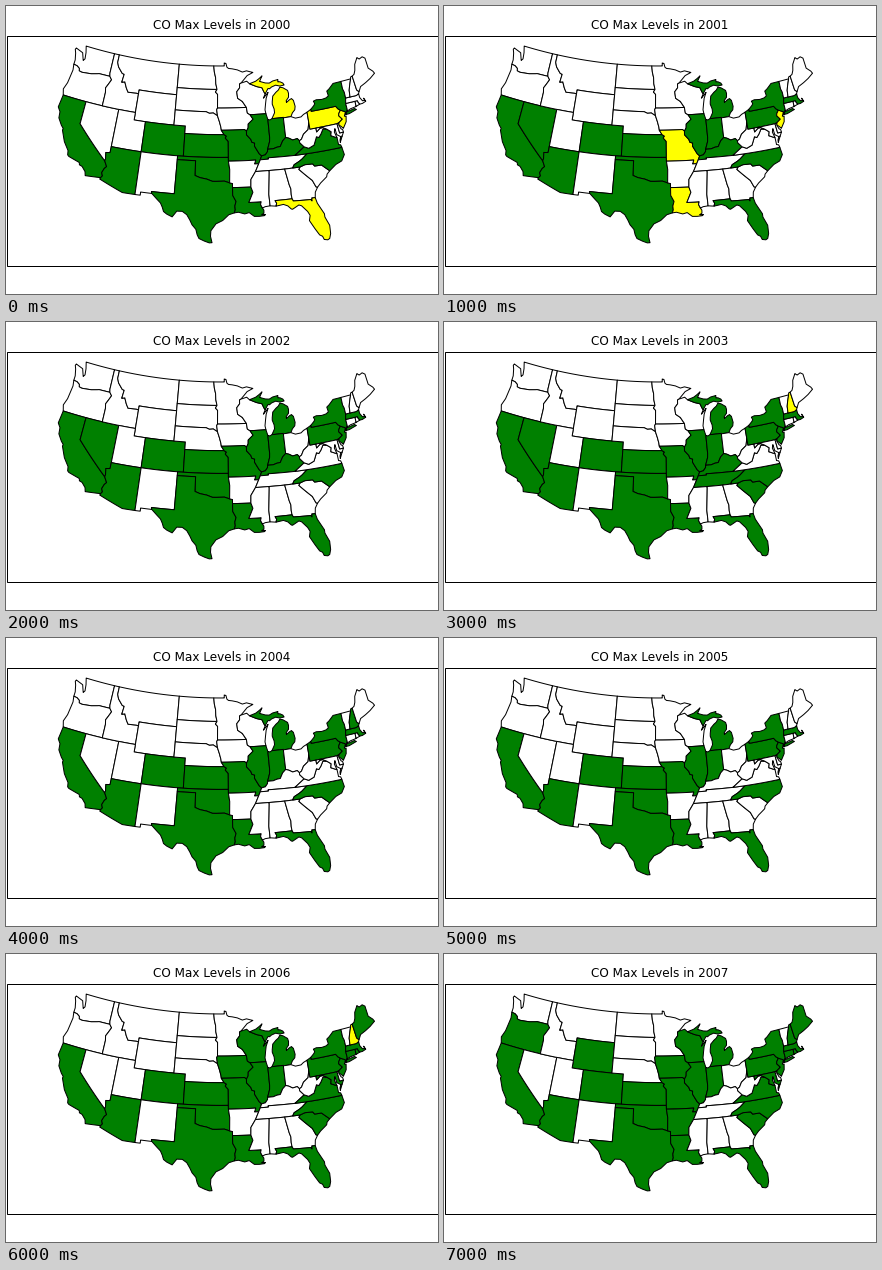
Recreate the animation shown at these times as a matplotlib script. Size 432 by 288 pixels, loop 8 s.

```python
import numpy as np
import matplotlib.pyplot as plt
from matplotlib.animation import FuncAnimation
from matplotlib.patches import PathPatch, Rectangle
from matplotlib.path import Path

W, H, DPI = 432, 288, 72
SCALE, X0, Y0 = 437.2, 214, -399.7
LAT1, LAT2, LON0 = np.radians(33), np.radians(45), 96


def half_tan(lat):
    return np.tan(np.pi / 4 + lat / 2)


N = np.log(np.cos(LAT1) / np.cos(LAT2)) / np.log(half_tan(LAT2) / half_tan(LAT1))
F = np.cos(LAT1) * half_tan(LAT1) ** N / N


def project(west, lat):
    """Lambert conformal conic, from degrees west and north to pixels."""
    rho = F / half_tan(np.radians(lat)) ** N
    theta = N * np.radians(LON0 - west)
    return X0 + SCALE * rho * np.sin(theta), Y0 + SCALE * rho * np.cos(theta)


def arc(*v):
    return np.reshape(v, (-1, 2)).astype(float)


def gap(p, q):
    return np.hypot(*(p - q))


def ring(*arcs):
    """Chain arcs end to end, flipping each one as needed, and project."""
    line = arcs[0]
    if len(arcs) > 1:
        ends = arcs[1][[0, -1]]
        if min(gap(line[0], e) for e in ends) < min(gap(line[-1], e) for e in ends):
            line = line[::-1]
    for a in arcs[1:]:
        if gap(a[-1], line[-1]) < gap(a[0], line[-1]):
            a = a[::-1]
        line = np.vstack([line, a])
    line = np.vstack([line, line[:1]])
    t = np.arange(len(line))
    fine = np.linspace(0, t[-1], t[-1] * 8 + 1)
    x, y = project(np.interp(fine, t, line[:, 0]), np.interp(fine, t, line[:, 1]))
    return Path(np.column_stack([x, y]), closed=True)


# Pacific coast and the far west
wa_sea = arc(124.08, 46.27, 124.08, 46.86, 124.4, 47.72, 124.69, 48.18, 124.57, 48.38,
             123.12, 48.04, 122.59, 47.1, 122.34, 47.36, 122.5, 48.18, 122.84, 49)
or_sea = arc(124.08, 46.27, 123.9, 45.52, 124.14, 43.71, 124.53, 42.77, 124.21, 42)
ca_sea = arc(124.21, 42, 124.4, 40.31, 123.87, 39.77, 123.73, 38.95, 122.95, 38.11,
             122.51, 37.78, 122.55, 37.55, 121.71, 36.16, 120.74, 35.16, 120.62, 34.61,
             120.37, 34.45, 118.52, 34.03, 118.41, 33.74, 117.94, 33.62, 117.3, 33.05,
             117.13, 32.54, 114.72, 32.72)
wa_top = arc(122.84, 49, 117.03, 49)
wa_or = arc(124.08, 46.27, 123.4, 46.2, 122.85, 45.95, 122.75, 45.65, 122.2, 45.57,
            121.2, 45.65, 120.4, 45.72, 119.3, 45.93, 119, 46, 116.92, 46)
wa_id = arc(117.03, 49, 117.04, 46.4, 116.92, 46)
or_id = arc(116.92, 46, 116.46, 45.6, 116.85, 44.95, 117.2, 44.4, 117.03, 43.8, 117.03, 42)
or_ca, or_nv = arc(124.21, 42, 120, 42), arc(120, 42, 117.03, 42)
nv_id, ut_id = arc(117.03, 42, 114.04, 42), arc(114.04, 42, 111.05, 42)
ca_nv = arc(120, 42, 120, 39, 114.63, 35)
nv_az = arc(114.63, 35, 114.57, 35.3, 114.72, 36.1, 114.05, 36.2, 114.04, 37)
nv_ut, ut_az = arc(114.04, 37, 114.04, 42), arc(114.04, 37, 109.05, 37)
ca_az = arc(114.63, 35, 114.15, 34.3, 114.45, 34, 114.72, 33.4, 114.5, 33, 114.72, 32.72)
az_mex = arc(114.72, 32.72, 114.81, 32.52, 111.02, 31.33, 109.05, 31.33)
az_nm = arc(109.05, 37, 109.05, 31.33)

# Rockies
id_top, mt_top = arc(117.03, 49, 116.05, 49), arc(116.05, 49, 104.05, 49)
id_mt = arc(116.05, 49, 116.05, 48, 115.7, 47.45, 114.75, 46.72, 114.35, 46.65,
            114.5, 45.57, 113.95, 45.7, 113.45, 44.95, 113, 44.45, 111.5, 44.53, 111.05, 44.48)
id_wy = arc(111.05, 44.48, 111.05, 42)
mt_wy = arc(111.05, 44.48, 111.05, 45, 104.05, 45)
ut_wy = arc(111.05, 42, 111.05, 41, 109.05, 41)
wy_co, wy_ne = arc(109.05, 41, 104.05, 41), arc(104.05, 41, 104.05, 43)
wy_sd = arc(104.05, 43, 104.05, 45)
mt_sd, mt_nd = arc(104.05, 45, 104.05, 45.94), arc(104.05, 45.94, 104.05, 49)
ut_co = arc(109.05, 41, 109.05, 37)
co_ne = arc(104.05, 41, 102.05, 41, 102.05, 40)
co_ks = arc(102.05, 40, 102.05, 37)
co_nm, co_ok = arc(109.05, 37, 103, 37), arc(103, 37, 102.05, 37)
nm_ok = arc(103, 37, 103, 36.5)
nm_tx = arc(103, 36.5, 103.06, 32, 106.6, 32, 106.51, 31.755)
nm_mex = arc(106.51, 31.755, 108.24, 31.755, 108.24, 31.34, 109.05, 31.33)

# Plains
nd_top = arc(104.05, 49, 97.23, 49)
nd_sd = arc(104.05, 45.94, 96.56, 45.94)
nd_mn = arc(97.23, 49, 97.1, 48.2, 96.85, 47.5, 96.8, 46.7, 96.56, 45.94)
sd_mn = arc(96.56, 45.94, 96.85, 45.6, 96.45, 45.3, 96.45, 43.5)
sd_ia = arc(96.45, 43.5, 96.6, 43.3, 96.45, 42.49)
sd_ne = arc(104.05, 43, 98.5, 43, 97.9, 42.8, 97.2, 42.85, 96.45, 42.49)
ne_ia = arc(96.45, 42.49, 96.1, 41.7, 95.85, 41, 95.77, 40.58)
ne_mo, ne_ks = arc(95.77, 40.58, 95.3, 40), arc(102.05, 40, 95.3, 40)
ks_mo = arc(95.3, 40, 94.9, 39.8, 95.1, 39.55, 94.6, 39.1, 94.62, 37)
ks_ok = arc(102.05, 37, 94.62, 37)
ok_tx = arc(103, 36.5, 100, 36.5, 100, 34.56, 99.2, 34.3, 98.1, 34.13, 97.2, 33.85,
            96.6, 33.85, 95.3, 33.88, 94.48, 33.64)
ok_mo, ok_ar = arc(94.62, 37, 94.62, 36.5), arc(94.62, 36.5, 94.43, 35.4, 94.48, 33.64)
tx_ar = arc(94.48, 33.64, 94.04, 33.55, 94.04, 33.02)
tx_la = arc(94.04, 33.02, 94.04, 32, 93.55, 31.2, 93.75, 30.6, 93.7, 30.1, 93.85, 29.71)
rio = arc(106.51, 31.755, 105.63, 31.08, 105.04, 30.64, 104.71, 30.12, 104.46, 29.57,
          103.94, 29.27, 103.11, 28.97, 102.48, 29.76, 101.66, 29.78, 100.96, 29.38,
          100.46, 28.7, 100.11, 28.11, 99.52, 27.54, 99.3, 26.84, 99.02, 26.37,
          98.24, 26.06, 97.53, 25.84, 97.14, 25.87)
tx_sea = arc(97.14, 25.87, 97.37, 26.69, 97.33, 27.4, 96.59, 28.31, 95.6, 28.74,
             94.69, 29.48, 93.85, 29.71)

# Upper Mississippi and the Great Lakes
mn_top = arc(97.23, 49, 95.16, 49, 95.16, 49.38, 94.82, 49.32, 94.64, 48.84, 94.33, 48.67,
             93.63, 48.61, 92.61, 48.45, 91.64, 48.14, 90.83, 48.27, 89.6, 48.01)
mn_lake = arc(89.6, 48.01, 90.75, 47.65, 92.01, 46.71)
mn_wi = arc(92.01, 46.71, 92.29, 46.6, 92.3, 46.1, 92.87, 45.6, 92.75, 44.75,
            91.9, 44.3, 91.22, 43.5)
mn_ia = arc(96.45, 43.5, 91.22, 43.5)
wi_north = arc(92.01, 46.71, 90.9, 46.92, 90.4, 46.57)
wi_mi = arc(90.4, 46.57, 89.1, 46.14, 88.1, 45.92, 87.8, 45.35, 87.6, 45.1)
wi_east = arc(87.6, 45.1, 88, 44.55, 87.05, 45.25, 87.5, 44.5, 87.7, 43.8, 87.9, 43, 87.8, 42.49)
mi_upper = arc(90.4, 46.57, 89.2, 46.84, 88.5, 47.15, 87.9, 47.47, 88.45, 46.78, 87.4, 46.51,
               86.65, 46.44, 85.95, 46.67, 84.95, 46.78, 85, 46.48, 84.6, 46.45, 84.1, 46.24,
               83.9, 45.97, 84.72, 45.9, 85.5, 46.08, 86.3, 45.9, 86.7, 45.7, 87, 45.75,
               87.6, 45.1)
mi_lower = arc(86.82, 41.76, 86.25, 42.5, 86.25, 43, 86.5, 43.65, 86.45, 44, 86.25, 44.7,
               85.6, 45.15, 85.1, 45.4, 84.75, 45.75, 84.2, 45.63, 83.4, 45.2, 83.3, 44.8,
               83.4, 44.3, 83.9, 43.9, 83.9, 43.65, 83.3, 43.95, 82.9, 44.07, 82.6, 43.8,
               82.45, 43, 82.6, 42.55, 83.1, 42.2, 83.45, 41.73)
mi_in, mi_oh = arc(86.82, 41.76, 84.8, 41.76), arc(84.8, 41.7, 83.45, 41.73)
ia_wi = arc(91.22, 43.5, 91.1, 42.75, 90.64, 42.51)
wi_il = arc(90.64, 42.51, 87.8, 42.49)
ia_il = arc(90.64, 42.51, 90.15, 41.9, 91.05, 41.3, 91.1, 40.8, 91.42, 40.38)
ia_mo = arc(95.77, 40.58, 91.75, 40.6, 91.42, 40.38)
mo_il = arc(91.42, 40.38, 91.45, 39.9, 90.75, 39.25, 90.6, 38.87, 90.15, 38.75,
            90.2, 38.35, 89.5, 37.3, 89.13, 37)
il_lake = arc(87.8, 42.49, 87.55, 41.71)
in_lake = arc(87.55, 41.71, 87.2, 41.62, 86.82, 41.76)
il_in = arc(87.55, 41.71, 87.53, 39.35, 87.6, 38.8, 88.05, 37.8)
in_oh = arc(84.8, 41.7, 84.82, 39.1)
oh_lake = arc(83.45, 41.73, 82.7, 41.45, 81.7, 41.5, 81.2, 41.77, 80.52, 41.98)

# Ohio valley and the South
il_ky = arc(89.13, 37, 88.5, 37.1, 88.1, 37.5, 88.05, 37.8)
in_ky = arc(88.05, 37.8, 87.1, 37.8, 86.5, 37.95, 85.9, 38, 85.4, 38.7, 84.82, 39.1)
oh_ky = arc(84.82, 39.1, 84.3, 38.95, 83.7, 38.65, 82.9, 38.75, 82.59, 38.42)
ky_wv = arc(82.59, 38.42, 82.6, 38.17, 81.97, 37.54)
ky_va = arc(81.97, 37.54, 83.68, 36.6)
ky_tn = arc(89.4, 36.5, 88.07, 36.5, 88.07, 36.68, 83.68, 36.6)
mo_ky, mo_tn = arc(89.13, 37, 89.4, 36.5), arc(89.4, 36.5, 89.7, 36)
mo_ar = arc(94.62, 36.5, 90.15, 36.5, 90.37, 36, 89.7, 36)
ar_tn = arc(89.7, 36, 90.3, 35)
ar_ms = arc(90.3, 35, 91.1, 34, 91.17, 33)
ar_la = arc(94.04, 33.02, 91.17, 33)
la_ms = arc(91.17, 33, 90.9, 32.3, 91.6, 31, 89.73, 31, 89.85, 30.65, 89.6, 30.16)
la_sea = arc(93.85, 29.71, 93.23, 29.78, 92.3, 29.53, 91.63, 29.68, 90.88, 29.15, 90.16, 29.12,
             89.41, 29.16, 89.22, 29.29, 89.78, 29.31, 89.43, 29.49, 89.41, 29.89, 89.6, 30.16)
ms_sea = arc(89.6, 30.16, 89.18, 30.32, 88.42, 30.38)
ms_al = arc(88.2, 35, 88.1, 34.9, 88.47, 31.9, 88.42, 30.38)
al_sea = arc(88.42, 30.38, 87.53, 30.27)
tn_ms, tn_al = arc(90.3, 35, 88.2, 35), arc(88.2, 35, 85.6, 34.98)
tn_ga, nc_ga = arc(85.6, 34.98, 84.32, 34.99), arc(84.32, 34.99, 83.1, 35)
al_ga = arc(85.6, 34.98, 85.18, 32.87, 85, 32.3, 85.05, 31.55, 85, 31)
al_fl = arc(85, 31, 87.6, 31, 87.4, 30.65, 87.53, 30.27)
ga_fl = arc(85, 31, 84.86, 30.7, 82.2, 30.57, 82.05, 30.36, 82, 30.75, 81.49, 30.73)
fl_sea = arc(87.53, 30.27, 86.4, 30.4, 85.77, 30.15, 85.29, 29.69, 85.11, 29.64, 84.1, 30.09,
             83.71, 29.94, 82.93, 29.1, 82.65, 28.55, 82.86, 27.89, 82.24, 26.76, 81.71, 25.87,
             81.33, 25.64, 81.17, 25.2, 80.68, 25.08, 80.38, 25.21, 80.13, 25.82, 80.06, 26.88,
             80.54, 28.04, 80.53, 28.47, 81.31, 29.97, 81.49, 30.73)
ga_sea = arc(81.49, 30.73, 81.34, 31.44, 80.87, 32.03)
ga_sc = arc(83.1, 35, 83.35, 34.7, 82.6, 34, 81.5, 33, 81.1, 32.1, 80.87, 32.03)
sc_sea = arc(80.87, 32.03, 80.3, 32.5, 79.2, 33.16, 79.06, 33.49, 78.55, 33.86)
nc_sc = arc(83.1, 35, 82.3, 35.2, 81.04, 35.15, 80.78, 34.82, 79.67, 34.8, 78.55, 33.86)
nc_tn = arc(84.32, 34.99, 84, 35.4, 83.1, 35.75, 82.6, 36, 81.68, 36.59)
nc_va, tn_va = arc(81.68, 36.59, 75.87, 36.55), arc(83.68, 36.6, 81.68, 36.59)
nc_sea = arc(75.87, 36.55, 75.73, 35.55, 76.36, 34.81, 77.4, 34.51, 78.55, 33.86)

# Mid-Atlantic
oh_wv = arc(82.59, 38.42, 82.2, 38.6, 81.75, 39.2, 80.85, 39.7, 80.6, 40.4, 80.52, 40.64)
oh_pa = arc(80.52, 40.64, 80.52, 41.98)
wv_pa, pa_md = arc(80.52, 40.64, 80.52, 39.72, 79.48, 39.72), arc(79.48, 39.72, 75.79, 39.72)
wv_md = arc(79.48, 39.72, 79.48, 39.2, 78.8, 39.6, 78.35, 39.62, 77.72, 39.32)
wv_va = arc(77.72, 39.32, 78.35, 39.4, 78.85, 38.8, 79.3, 38.42, 79.65, 38.58,
            80.3, 37.55, 81.25, 37.25, 81.97, 37.54)
md_va = arc(77.72, 39.32, 77.05, 38.85, 77.25, 38.35, 76.3, 37.92)
va_sea = arc(76.3, 37.92, 76.3, 37, 75.97, 36.9, 75.87, 36.55)
va_shore = arc(75.94, 37.22, 75.9, 37.55, 75.65, 37.95, 75.38, 38.02)
md_sea = arc(75.05, 38.45, 75.38, 38.02, 75.65, 37.95, 76.23, 38.32, 76.33, 39.15,
             76.54, 38.72, 76.3, 37.92)
md_de = arc(75.79, 39.72, 75.7, 38.46, 75.05, 38.45)
de_sea = arc(75.05, 38.45, 75.07, 38.78, 75.32, 38.96, 75.53, 39.5)
de_top, de_nj = arc(75.79, 39.72, 75.42, 39.8), arc(75.42, 39.8, 75.53, 39.5)
pa_nj = arc(75.42, 39.8, 74.72, 40.15, 75.2, 40.7, 75.1, 40.97, 74.69, 41.36)
nj_sea = arc(75.53, 39.5, 75.2, 39.25, 74.91, 38.94, 74.18, 39.71, 73.96, 40.43, 74.26, 40.47)
pa_ny = arc(79.76, 42.27, 79.76, 42, 75.35, 42, 75.05, 41.6, 74.69, 41.36)
pa_lake = arc(80.52, 41.98, 79.76, 42.27)
ny_nj = arc(74.69, 41.36, 73.9, 41, 74.26, 40.47)
ny_sea = arc(73.9, 41, 73.95, 40.75, 73.66, 41)
ny_lake = arc(79.76, 42.27, 79.1, 42.7, 78.9, 42.9, 79.05, 43.26, 78.5, 43.37, 77.5, 43.27,
              76.7, 43.35, 76.2, 43.55, 76.3, 44.2, 75.8, 44.43, 74.87, 45, 73.35, 45.01)
long_island = arc(73.98, 40.63, 73.35, 40.63, 71.95, 40.93, 72.24, 41.12, 73.71, 40.93)

# New England
ny_ct = arc(73.66, 41, 73.5, 41.2, 73.5, 42.05)
ny_ma = arc(73.5, 42.05, 73.27, 42.75)
ny_vt = arc(73.27, 42.75, 73.25, 43.55, 73.4, 44, 73.35, 45.01)
vt_top, nh_top = arc(73.35, 45.01, 71.5, 45.01), arc(71.5, 45.01, 71.4, 45.25, 71.08, 45.3)
vt_nh = arc(72.46, 42.73, 72.3, 43.6, 72.05, 44.1, 71.5, 45.01)
vt_ma, nh_ma = arc(73.27, 42.75, 72.46, 42.73), arc(72.46, 42.73, 71.3, 42.7, 70.82, 42.87)
nh_me, nh_sea = arc(71.08, 45.3, 70.98, 43.4, 70.65, 43.09), arc(70.82, 42.87, 70.65, 43.09)
ct_ma, ct_ri = arc(73.5, 42.05, 71.8, 42.02), arc(71.8, 42.02, 71.86, 41.32)
ct_sea = arc(73.66, 41, 72.88, 41.22, 72.3, 41.27, 71.86, 41.32)
ri_ma = arc(71.8, 42.02, 71.38, 42.02, 71.3, 41.75, 71.12, 41.49)
ri_sea = arc(71.86, 41.32, 71.12, 41.49)
ma_sea = arc(71.12, 41.49, 70.64, 41.48, 69.97, 41.64, 70.19, 42.1, 70.08, 41.78,
             70.5, 41.81, 70.83, 42.34, 70.82, 42.87)
me_sea = arc(70.65, 43.09, 70.12, 43.68, 69.06, 43.98, 68.03, 44.33, 66.96, 44.81)
me_top = arc(66.96, 44.81, 67.14, 45.14, 67.79, 45.7, 67.79, 47.07, 68.23, 47.35, 68.9, 47.18,
             69.24, 47.45, 70, 46.69, 70.31, 45.92, 70.66, 45.46, 71.08, 45.3)

STATES = dict(
    WA=[ring(wa_sea, wa_top, wa_id, wa_or)],
    OR=[ring(wa_or, or_id, or_nv, or_ca, or_sea)],
    CA=[ring(or_ca, ca_nv, ca_az, ca_sea)],
    NV=[ring(or_nv, nv_id, nv_ut, nv_az, ca_nv)],
    ID=[ring(id_top, id_mt, id_wy, ut_id, nv_id, or_id, wa_id)],
    MT=[ring(mt_top, mt_nd, mt_sd, mt_wy, id_mt)],
    WY=[ring(mt_wy, wy_sd, wy_ne, wy_co, ut_wy, id_wy)],
    UT=[ring(ut_id, ut_wy, ut_co, ut_az, nv_ut)],
    AZ=[ring(ut_az, az_nm, az_mex, ca_az, nv_az)],
    CO=[ring(wy_co, co_ne, co_ks, co_ok, co_nm, ut_co)],
    NM=[ring(co_nm, nm_ok, nm_tx, nm_mex, az_nm)],
    ND=[ring(nd_top, nd_mn, nd_sd, mt_nd)],
    SD=[ring(nd_sd, sd_mn, sd_ia, sd_ne, wy_sd, mt_sd)],
    NE=[ring(sd_ne, ne_ia, ne_mo, ne_ks, co_ne, wy_ne)],
    KS=[ring(ne_ks, ks_mo, ks_ok, co_ks)],
    OK=[ring(co_ok, ks_ok, ok_mo, ok_ar, ok_tx, nm_ok)],
    TX=[ring(ok_tx, tx_ar, tx_la, tx_sea, rio, nm_tx)],
    MN=[ring(mn_top, mn_lake, mn_wi, mn_ia, sd_mn, nd_mn)],
    IA=[ring(mn_ia, ia_wi, ia_il, ia_mo, ne_ia, sd_ia)],
    MO=[ring(ia_mo, mo_il, mo_ky, mo_tn, mo_ar, ok_mo, ks_mo, ne_mo)],
    AR=[ring(mo_ar, ar_tn, ar_ms, ar_la, tx_ar, ok_ar)],
    LA=[ring(ar_la, la_ms, la_sea, tx_la)],
    WI=[ring(wi_north, wi_mi, wi_east, wi_il, ia_wi, mn_wi)],
    IL=[ring(wi_il, il_lake, il_in, il_ky, mo_il, ia_il)],
    MI=[ring(mi_upper, wi_mi), ring(mi_lower, mi_oh, mi_in)],
    IN=[ring(in_lake, mi_in, in_oh, in_ky, il_in)],
    OH=[ring(mi_oh, oh_lake, oh_pa, oh_wv, oh_ky, in_oh)],
    KY=[ring(il_ky, in_ky, oh_ky, ky_wv, ky_va, ky_tn, mo_ky)],
    TN=[ring(ky_tn, tn_va, nc_tn, tn_ga, tn_al, tn_ms, ar_tn, mo_tn)],
    MS=[ring(tn_ms, ms_al, ms_sea, la_ms, ar_ms)],
    AL=[ring(tn_al, al_ga, al_fl, al_sea, ms_al)],
    GA=[ring(tn_ga, nc_ga, ga_sc, ga_sea, ga_fl, al_ga)],
    FL=[ring(al_fl, ga_fl, fl_sea)],
    SC=[ring(nc_sc, sc_sea, ga_sc)],
    NC=[ring(nc_va, nc_sea, nc_sc, nc_ga, nc_tn)],
    VA=[ring(wv_va, md_va, va_sea, nc_va, tn_va, ky_va), ring(va_shore)],
    WV=[ring(oh_wv, wv_pa, wv_md, wv_va, ky_wv)],
    PA=[ring(pa_lake, pa_ny, pa_nj, de_top, pa_md, wv_pa, oh_pa)],
    MD=[ring(pa_md, md_de, md_sea, md_va, wv_md)],
    DE=[ring(de_top, de_nj, de_sea, md_de)],
    NJ=[ring(ny_nj, nj_sea, de_nj, pa_nj)],
    NY=[ring(ny_lake, ny_vt, ny_ma, ny_ct, ny_sea, ny_nj[:2], pa_ny), ring(long_island)],
    CT=[ring(ct_ma, ct_ri, ct_sea, ny_ct)],
    RI=[ring(ri_ma, ri_sea, ct_ri)],
    MA=[ring(vt_ma, nh_ma, ma_sea, ri_ma, ct_ma, ny_ma)],
    VT=[ring(vt_top, vt_nh, vt_ma, ny_vt)],
    NH=[ring(nh_top, nh_me, nh_sea, nh_ma, vt_nh)],
    ME=[ring(me_top, me_sea, nh_me)],
)

ALWAYS = "CA AZ CO KS OK TX IL IN NY NC "
# Per year: further green states, yellow states
LEVELS = [
    ("LA MO KY VA", "MI PA FL NJ"),
    ("NV KY MI PA MA FL", "MO LA NJ"),
    ("NV KY MI PA MA FL MO LA NJ", ""),
    ("NV KY TN SC MI PA MA FL MO LA NJ", "NH"),
    ("MI PA MA NH FL MO LA NJ", ""),
    ("MI PA MA FL MO LA NJ", ""),
    ("MI PA MA FL MO LA NJ IA WI CT RI ME VA SC MD", "NH"),
    ("MI PA MA FL MO LA NJ IA WI CT RI ME VA SC MD NH OR WY AR", ""),
]

fig = plt.figure(figsize=(W / DPI, H / DPI), dpi=DPI, facecolor="white")
ax = fig.add_axes([0, 0, 1, 1])
ax.set(xlim=(0, W), ylim=(H, 0))
ax.axis("off")
ax.add_patch(Rectangle((0.5, 29.5), W - 1, 230, fill=False, lw=1))
title = ax.text(W / 2, 22.6, "", ha="center", va="baseline",
                family="DejaVu Sans", size=12)
patches = {
    name: ax.add_patch(PathPatch(Path.make_compound_path(*rings), fc="white", ec="black",
                                 lw=1, joinstyle="round"))
    for name, rings in STATES.items()
}


def update(i):
    green, yellow = LEVELS[i]
    green = (ALWAYS + green).split()
    for name, patch in patches.items():
        patch.set_facecolor("green" if name in green
                            else "yellow" if name in yellow.split() else "white")
    title.set_text(f"CO Max Levels in {2000 + i}")
    return [title, *patches.values()]


anim = FuncAnimation(fig, update, frames=len(LEVELS), interval=1000, repeat=True)
plt.show()
```
